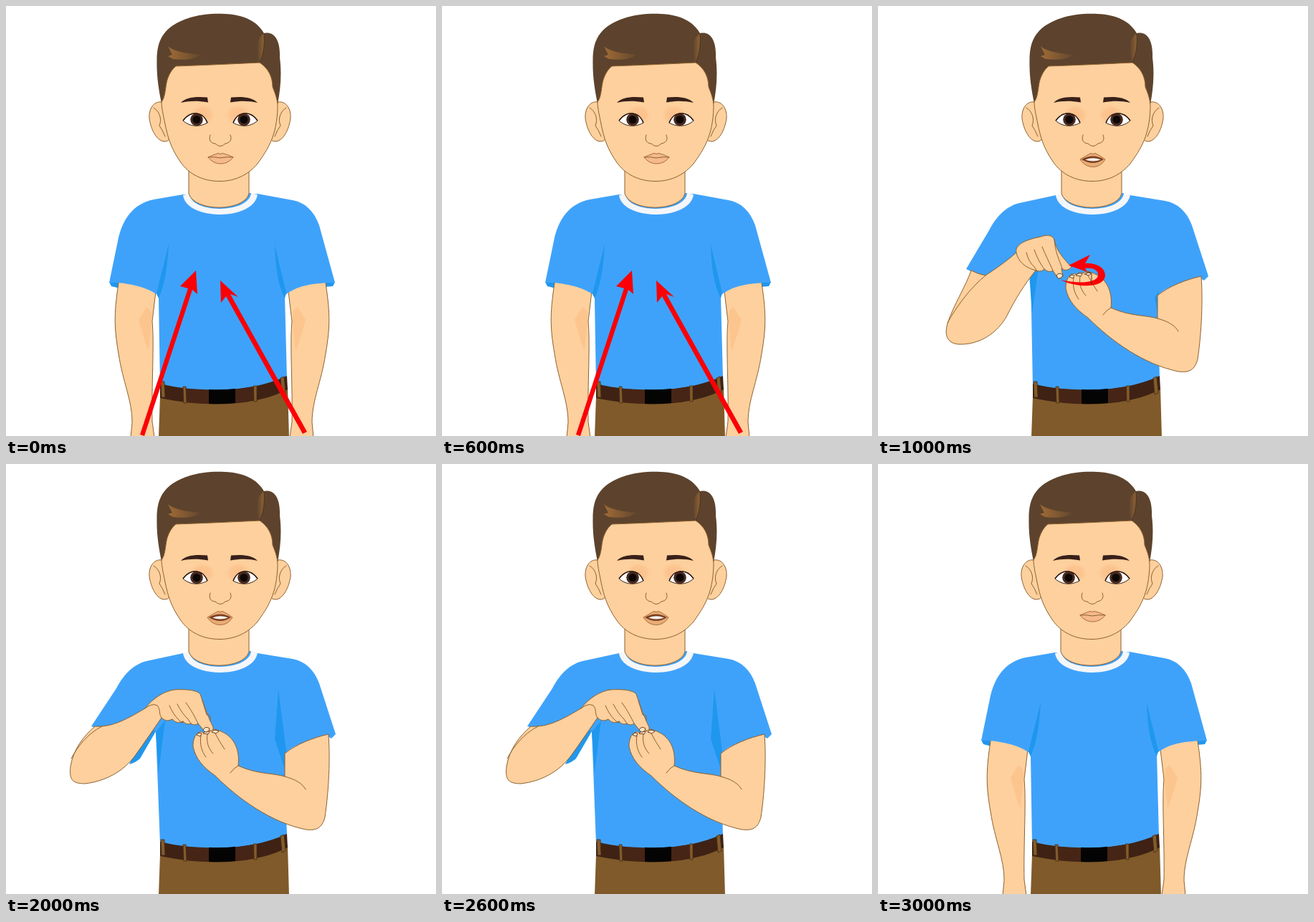
An HTML page for the animation above (4000 ms loop, 600 by 600 pixels).

```html
<!DOCTYPE html>
<html lang="en">
<head>
<meta charset="utf-8">
<title>Signing boy</title>
<style>
html, body { margin: 0; width: 100%; height: 100%; overflow: hidden; background: #fff; }
svg { display: block; width: 100%; height: 100%; }
.skin { fill: #fdd09d; stroke: #8d612f; stroke-width: 1; stroke-linejoin: round; }
.line { fill: none; stroke: #8d612f; stroke-width: 1; stroke-linecap: round; }
.dark { stroke: #5b3218; }
.shirt { fill: #3fa2fa; }
.fold { fill: #1f97ee; }
.hair { fill: #5d432d; }
.brow { fill: #38201a; }
.shade { fill: #fdc58e; }
.red { fill: #fb0006; }
.loop { fill: #835c2b; stroke: #3d2816; stroke-width: .7; }
.nail { fill: #fde3c6; stroke: #5b3218; stroke-width: .9; }
</style>
</head>
<body>
<svg viewBox="0 0 600 600" xmlns="http://www.w3.org/2000/svg">
<defs>
  <linearGradient id="shineL"><stop offset="0" stop-color="#a06b36"/><stop offset="1" stop-color="#64482e"/></linearGradient>
  <linearGradient id="shineR"><stop offset="0" stop-color="#5d432d"/><stop offset="1" stop-color="#8f6334"/></linearGradient>
  <radialGradient id="blush"><stop offset="0" stop-color="#fcc08b"/><stop offset=".6" stop-color="#fcc590"/><stop offset="1" stop-color="#fdd09d" stop-opacity="0"/></radialGradient>
  <g id="eye">
    <ellipse cx="274" cy="152" rx="19" ry="16" fill="url(#blush)"/>
    <path d="M247 160C256 147 274 145 281 163C270 169 257 169 247 160Z" fill="#fff" stroke="#3a2015" stroke-width="1"/>
    <circle cx="266" cy="158.500" r="8.800" fill="#49291d"/>
    <circle cx="266" cy="158.500" r="5.500" fill="#0d0808"/>
    <path d="M247 160C256 147 274 145 281 163" fill="none" stroke="#2c1710" stroke-width="1.500"/>
  </g>
  <path id="brow" class="brow" d="M244 135C251 127 266 126 281 127.500L282 134.500C268 132 256 132 244 135Z"/>
  <g id="ear">
    <path class="skin" d="M218 134C205 132 199 145 200 157C202 171 209 187 220 189C226 189 229 187 227 181Z"/>
    <path class="line" d="M206 142C214 147 218 157 214 167Q218 172 222 182"/>
  </g>
  <g id="restArm">
    <path class="skin" d="M158 380C151 425 150 445 157 485C163 525 176 550 176 581L174 602H207L204 580C203 530 207 470 204 440L210 390Z"/>
    <path class="shade" d="M196 420L185 438C190 455 194 470 199 481C201 455 205 435 202 425Z"/>
  </g>
  <path id="sleeveR" class="shirt" d="M300 285L351 264L400 272C417 275 430 287 437 306L460 377L454 383L449 380C428 384 402 391 389 404L300 420Z"/>
</defs>

<g id="stage">
  <!-- resting body -->
  <g data-on="0 3">
    <path class="fold" d="M144 385L147 391L159 394V384ZM459 385L456 391L444 392V384Z"/>
    <use href="#restArm"/>
    <use href="#restArm" transform="matrix(-1 0 0 1 603 0)"/>
    <path class="shirt" d="M247 263L206 270C177 276 162 298 156 328L144 386C165 385 194 391 210 402L213 407L215 530Q300 550 392 520L389 404C402 392 425 386 459 386L437 306C430 286 417 274 400 271L351 262Z"/>
    <path class="fold" d="M227 332L210 401L213 408C221 390 225 370 227 332ZM375 333C376 365 379 388 389 408L391 400Z"/>
  </g>
  <!-- raised arms: shirts -->
  <g data-on="1">
    <path class="shirt" d="M247 264L196 275C176 280 163 296 154 313L122 367Q135 374 150 376L212 372L215 530Q300 550 392 520L389 404L351 264Z"/>
    <use href="#sleeveR"/>
    <path class="fold" d="M210 374L223 366L214 428ZM391 397L385 407L389 428Z"/>
  </g>
  <g data-on="2">
    <path class="fold" d="M172 419Q182 416 187 411L212 368L200 360Z"/>
    <path class="shirt" d="M247 264L196 275C176 280 163 296 154 313L119 366Q135 372 150 375L209 372L215 530Q300 550 392 520L389 404L351 264Z"/>
    <use href="#sleeveR"/>
    <path class="fold" d="M209 374L222 358L213 430ZM380 314L375 384L389 426L391 400Z"/>
  </g>

  <!-- trousers and belt -->
  <path d="M215 545Q300 565 393 532L395 602H213Z" fill="#805a2a"/>
  <path d="M215 527C270 541 345 539 392 516L393 535C350 558 280 561 215 547Z" fill="#3f2214"/>
  <path d="M252 534L283 535.500V555L252 553ZM320 535L346 531V550L320 554Z" fill="#472516"/>
  <path d="M283 535Q302 536 320 534V554Q302 556 283 555Z" fill="#050404"/>
  <path class="loop" d="M216 524H221L222 546H217ZM247 531H251L252 554H248ZM345.500 530H350V552H346ZM383 519L388 517L390 540L385 542Z"/>

  <!-- neck and collar -->
  <path d="M247 264C252 300 346 300 351 263L341 261L256 262Z" fill="#f4f6fa"/>
  <path class="shirt" d="M256 262C258 290 339 290 342 261Z"/>
  <path class="skin" d="M255 200V262C264 288 332 287 339 262V200Z"/>

  <!-- head -->
  <use href="#ear"/>
  <use href="#ear" transform="matrix(-1 0 0 1 597 0)"/>
  <path class="hair" d="M217 136C213 116 210 98 210.500 76C210.500 52 217 38 233 27C253 14 279 10 305 11C333 12 351 22 360 38C374 35 383 47 382 72C385 95 383 116 379 137Z"/>
  <path class="skin" d="M237 84Q292 82 354 79C366 87 372 99 372 113C376 123 379 131 379 141C378 181 366 199 351 220C335 239 315 244.500 298 244.500C275 244.500 255 235 243 217C230 198 226 184 222 165C219 150 217 141 217 134C223 126 222 113 225 103C228 94 232 88 237 84Z"/>
  <path d="M226 56Q235 65 271 68Q262 77 233 74L226 70L232 68Z" fill="url(#shineL)"/>
  <path d="M360 38C347 48 349 63 354 79C360 68 361 53 360 38Z" fill="url(#shineR)"/>
  <path d="M354 79C360 66 361 53 360 38" fill="none" stroke="#402b1d" stroke-width=".8"/>
  <use href="#eye"/>
  <use href="#eye" transform="matrix(-1 0 0 1 598 0)"/>
  <use href="#brow"/>
  <use href="#brow" transform="matrix(-1 0 0 1 595 0)"/>
  <path class="line" d="M285 180C282 188 287 192 292 192Q299 199 306 192C312 191 316 187 313 180"/>
  <g data-on="0 3">
    <path d="M282 211Q291 207 296 205.500Q299 207.500 302 205.500Q309 207 317 211C308 223 291 223 282 211Z" fill="#f5b98a" stroke="#a96b3b"/>
    <path class="line" d="M282 211Q291 210 299 212Q308 210 317 211"/>
  </g>
  <g data-on="1 2">
    <path d="M281 214Q291 208 296 205.500Q299 207.500 302 205.500Q308 208 316 214C308 228 290 228 281 214Z" fill="#e8ac76" stroke="#a96b3b"/>
    <path d="M283 214Q299 205 314 214Q299 224 283 214Z" fill="#7c3f20"/>
    <path d="M288 214.500Q299 210 310 214.500Q299 218.500 288 214.500Z" fill="#f7f2ee"/>
  </g>

  <!-- cupped hand -->
  <g data-on="1 2">
    <path class="skin" d="M389 404C405 391 428 382 450 377C453 420 449 466 445 493C441 508 433 512 418 510C370 500 325 468 292 435C276 424 264 411 261 394C261 384 264 378 268 375Q273 372 276 375Q280 370 285 373Q290 368 297 372C316 378 327 396 324 421C350 433 372 431 389 436Z"/>
    <path class="line" d="M389 436C404 440 414 446 418 454M324 421Q318 424 313 431M272 379C270 391 273 401 279 409M281 377C279 388 283 398 289 404M292 376Q297 386 305 398"/>
    <path class="nail" d="M266 378Q268 374 273 376L271 380ZM275 376Q279 371 284 374L282 377ZM287 374Q291 369 297 373L293 376Z"/>
  </g>

  <!-- pointing hand, wide -->
  <g data-on="1">
    <path class="skin" d="M129 369C121 392 104 418 96 443C91 460 96 471 112 472C141 473 166 456 179 432C191 408 203 389 219 369C224 371 229 370 231 367Q238 373 243 369L248 377Q252 383 257 377L255 366Q262 372 269 364C258 353 247 340 245 326C242 319 234 319 226 322C200 327 190 335 192 344Q178 357 149 376Q138 374 129 369Z"/>
    <path class="line" d="M96 442C108 420 128 393 149 376M192 344C194 356 204 365 219 369M206 344Q209 357 217 364Q222 370 219 369M217 340C221 351 225 359 231 367M228 336C233 348 238 358 243 369M245 326C246 342 252 355 256 366"/>
    <path class="nail" d="M248 376Q251 371 257 375Q255 381 250 380Z"/>
    <path class="red" d="M254 382C274 387 304 388 306 376C307 368 298 365 288 366L291 371L265 362L295 347L288 359C304 358 316 365 316 376C315 395 274 393 254 382Z"/>
    <path class="line dark" d="M289 374Q293 370 297 374V388"/>
  </g>

  <!-- pointing hand, touching -->
  <g data-on="2">
    <path class="skin" d="M124 366C108 380 94 398 90 422C88 440 92 446 110 446C138 443 164 429 180 407C193 389 206 370 217 354Q224 361 232 356Q239 364 247 359Q252 365 258 362Q263 366 268 362L276 372Q280 376 284 372Q290 373 289 367C282 353 277 339 271 321C266 315 249 314 235 315C220 317 205 327 194 341C172 354 149 368 124 366Z"/>
    <path class="line" d="M91 411C100 394 113 377 134 366M194 341Q204 333 211 337C216 342 213 350 217 354M228 337Q233 349 241 357Q248 364 247 359M239 335Q246 349 254 356Q257 361 258 362M251 333C259 344 264 354 268 362M274 330L280 350Q287 349 285 358"/>
    <path class="nail" d="M275 371Q278 365 284 369Q283 374 278 374Z"/>
  </g>

  <!-- direction arrows -->
  <g data-on="0" class="red">
    <path d="M187 598L254 394L243 391L265 369L267 402L260 396L193 600Z"/>
    <path d="M414 597L307 405L300 414L299 383L324 406L313 402L420 594Z"/>
  </g>
</g>
</svg>
<script>
const HOLD = 1000;
const shifts = [0, 1, 0, 0];
const stage = document.getElementById('stage');
const parts = [...document.querySelectorAll('[data-on]')].map(el => ({
  el, poses: el.dataset.on.split(' ').map(Number)
}));
let shown = -1;

function show(pose) {
  if (pose === shown) return;
  shown = pose;
  for (const { el, poses } of parts) el.style.display = poses.includes(pose) ? '' : 'none';
  stage.setAttribute('transform', `translate(${shifts[pose]} 0)`);
}

const start = performance.now();
function tick() {
  const t = Math.max(0, performance.now() - start);
  show(Math.floor(t / HOLD) % shifts.length);
  requestAnimationFrame(tick);
}
tick();
</script>
</body>
</html>
```
